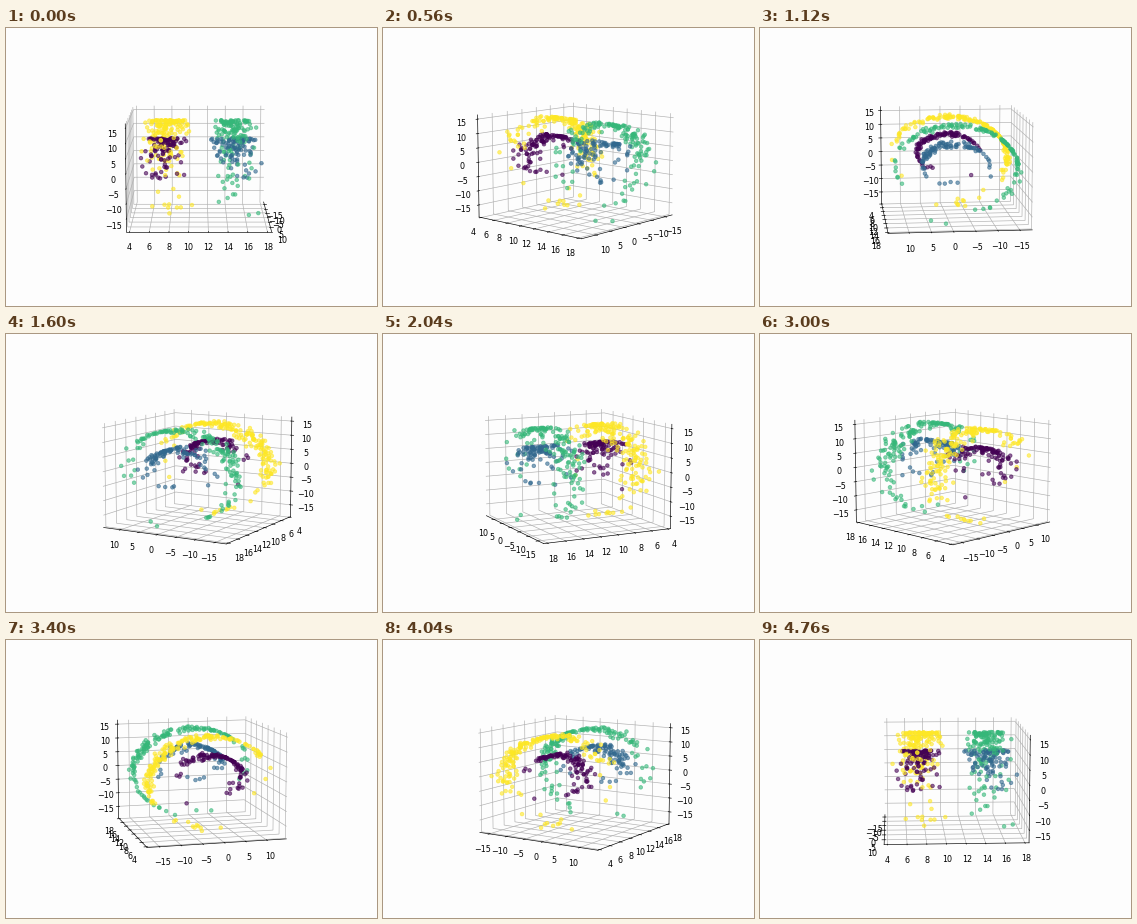
A matplotlib script that plays this animation: 371 by 278 pixels, repeating every 4800 ms.

```python
import numpy as np
import matplotlib.pyplot as plt
from matplotlib.animation import FuncAnimation

W, H, DPI = 371, 278, 58
FRAMES, INTERVAL = 120, 40
BACK = "#fdfdfd"

# Gaussian blobs before rolling: mean roll angle, mean y, number of points
BLOBS = [(7.5, 7.4, 110), (7.5, 14.8, 95), (14.8, 14.7, 150), (14.9, 7.4, 185)]
SPREAD = (1.05, 1.0)
LOW, HIGH = 4.4, 17.55

rng = np.random.default_rng(12)


def make_blob(angle, y, count):
    """Normal cloud of (angle, y), kept inside the sheet."""
    return np.clip(rng.normal((angle, y), SPREAD, (count, 2)), LOW, HIGH)


t, y = np.vstack([make_blob(*blob) for blob in BLOBS]).T
label = np.repeat(np.arange(len(BLOBS)), [count for *_, count in BLOBS])

fig = plt.figure(figsize=(W / DPI, H / DPI), dpi=DPI, facecolor=BACK)
ax = fig.add_subplot(projection="3d")
ax.set_facecolor(BACK)

# Roll the sheet up into a spiral
ax.scatter(t * np.cos(t), y, t * np.sin(t), c=label, cmap="viridis",
           s=20, alpha=0.6, depthshade=False)
ax.set_xlim(-17.8, 14.7)
ax.set_ylim(3.68, 18.42)
ax.set_zlim(-19.3, 16.45)
for axis in (ax.xaxis, ax.yaxis, ax.zaxis):
    axis.set_pane_color(BACK)


def update(frame):
    ax.view_init(elev=10, azim=frame * 360 / FRAMES)
    return []


anim = FuncAnimation(fig, update, frames=FRAMES, interval=INTERVAL,
                     repeat=True, repeat_delay=0)
plt.show()
```
